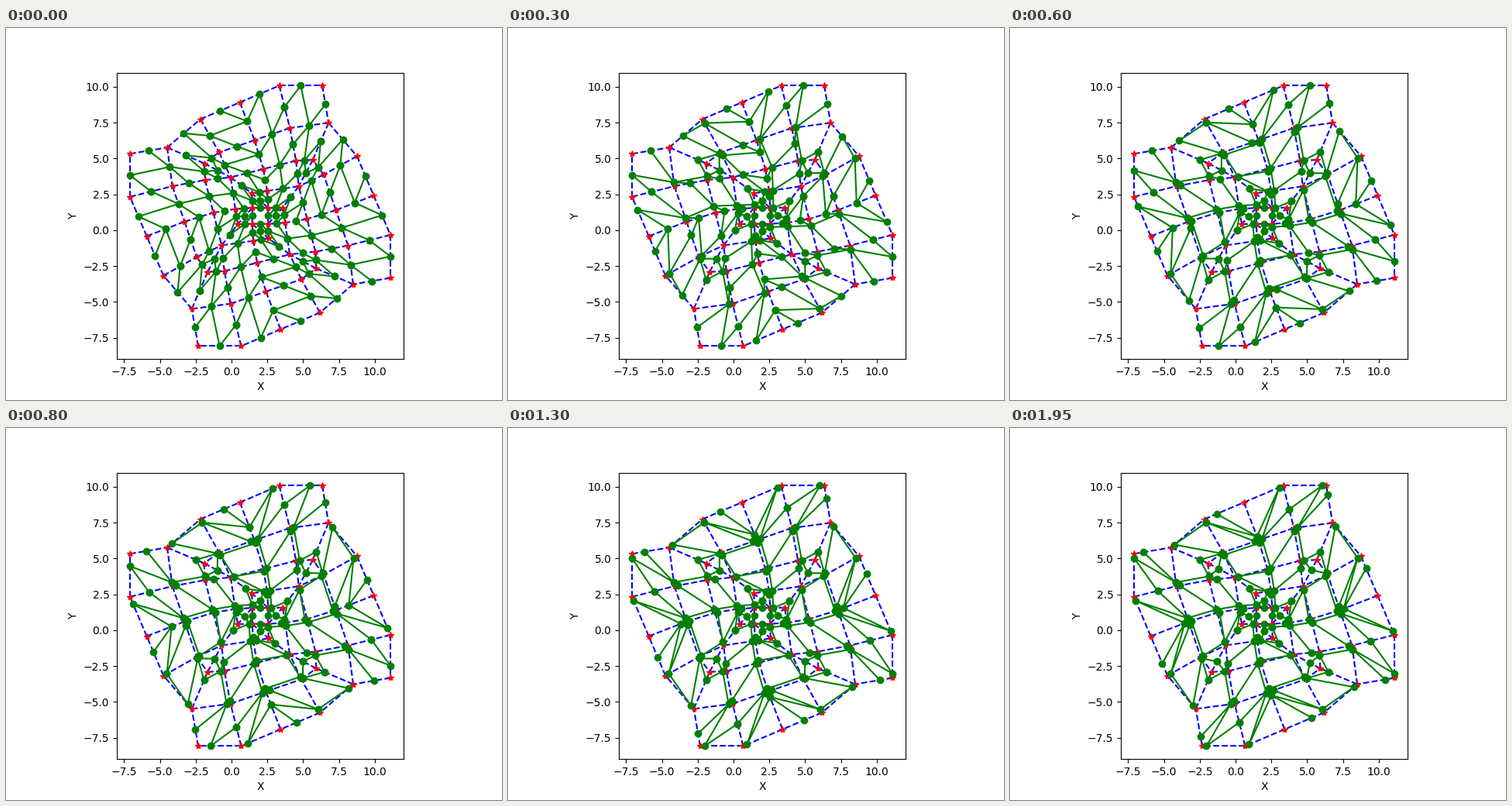
A matplotlib script that plays this animation: 640x480 px, repeating every 3000 ms.

```python
import numpy as np
import matplotlib.pyplot as plt
from matplotlib.animation import FuncAnimation

FRAMES, INTERVAL, LAST = 60, 50, 39
CENTER = 2 + 1j
HALF = 9.085

# One quarter of the mesh as offsets from the centre: each ring has a
# corner and an evenly spaced side. A digit after a name means that
# many quarter turns.
RINGS = [
    ("abcd", 4.33 + HALF * 1j, 1.33 + HALF * 1j, -4.17 + 6.75j),
    ("efgh", 4.77 + 6.49j, 2.07 + 6.13j, -2.87 + 4.43j),
    ("ijkl", 3.67 + 3.91j, 2.50 + 3.85j, -2.06 + 2.69j),
]
VERTS = {"m": 0.48 + 1.74j, "n": -0.58 + 1.57j, "o": 0.56 + 0.55j}
for letters, corner, first, last in RINGS:
    VERTS.update(zip(letters, [corner, *np.linspace(first, last, 3)]))

# Start and end vertex of every mesh edge; the digit turns the end.
EDGES = ("ba ae cb dc ed3 bf cg dh ef fg gh fj gk hl hi1 ij jk kl jl3 "
         "km ml3 mn no1 mo oo1 ei ln il3 on").split()

# Each edge carries a node, which starts halfway and slides along it:
# nodes, first step, last step, share of the edge.
SLIDES = [
    ("dh hl ml hi", 0, 7, -.4),
    ("ef fg", 0, 6, .4),
    ("ei ij no", 0, 6, .28),
    ("mn mo", 0, 9, -.28),
    ("ln", 0, 6, .2),
    ("jk", 0, 9, .4),
    ("kl", 0, 12, .4),
    ("gk km", 4, 11, -.4),
    ("fj", 5, 13, -.4),
    ("gh", 0, 17, -.4),
    ("ed", 0, 20, -.4),
    ("jl", 4, 22, -.2),
    ("ba", 4, 27, .4),
    ("cg", 4, 32, .4),
    ("ae", 6, 39, -.25),
    ("cb", 0, 9, .23), ("cb", 9, 22, .17),
    ("dc", 0, 6, .12), ("dc", 12, 39, -.31),
    ("bf", 0, 9, -.05), ("bf", 16, 32, .11),
    ("il", 26, 39, -.11),
]

# Nodes joined by bars, one zigzag for each face.
CHAINS = [
    "bf ba ef ae", "cg cb fg bf", "dc cg dh gh", "gk fg jk fj",
    "gh gk hl kl", "fj ef ij ei", "dh3 ed hi3 ei", "hl3 hi3 il",
    "jl ij il", "km jk ml jl", "km kl mn ln", "mo ml no3 ln3",
    "mo mn on", "oo no on",
]


def locate(name, table):
    """Look a name up, turning the point by its trailing digit."""
    key = name.rstrip("0123")
    turns = int(name[len(key):] or 0)
    return table[key] * 1j ** turns


def ends(edge):
    return locate(edge[0], VERTS), locate(edge[1:], VERTS)


def all_quarters(points):
    quarter = np.array(points)
    return CENTER + np.concatenate([quarter * 1j ** r for r in range(4)])


def ease(step, first, last):
    u = np.clip((step - first) / (last - first), 0, 1)
    return u * u * (3 - 2 * u)


def node_positions(step):
    share = {edge[:2]: .5 for edge in EDGES}
    for names, first, last, amount in SLIDES:
        for name in names.split():
            share[name] += amount * ease(step, first, last)
    pos = {}
    for edge in EDGES:
        p, q = ends(edge)
        pos[edge[:2]] = p + share[edge[:2]] * (q - p)
    return pos


def bar_points(step):
    pos = node_positions(step)
    pts = []
    for chain in CHAINS:
        pts += [locate(n, pos) for n in chain.split()] + [np.nan]
    return all_quarters(pts)


fig, ax = plt.subplots(figsize=(6.4, 4.8), dpi=100)

for edge in EDGES:
    for z in all_quarters(ends(edge)).reshape(4, 2):
        ax.plot(z.real, z.imag, "b--")

stars = all_quarters(list(VERTS.values()))
ax.plot(stars.real, stars.imag, "r*")
bars, = ax.plot([], [], "go-")

reach = 1.1 * HALF
ax.set_xticks(np.arange(-7.5, 10.1, 2.5))
ax.set_yticks(np.arange(-7.5, 10.1, 2.5))
ax.set_xlim(CENTER.real - reach, CENTER.real + reach)
ax.set_ylim(CENTER.imag - reach, CENTER.imag + reach)
ax.set_aspect("equal")
ax.set_xlabel("X")
ax.set_ylabel("Y")


def draw(frame):
    z = bar_points(min(frame, LAST))
    bars.set_data(z.real, z.imag)
    return bars,


anim = FuncAnimation(fig, draw, frames=FRAMES, interval=INTERVAL,
                     repeat=True, repeat_delay=0)
plt.show()
```
